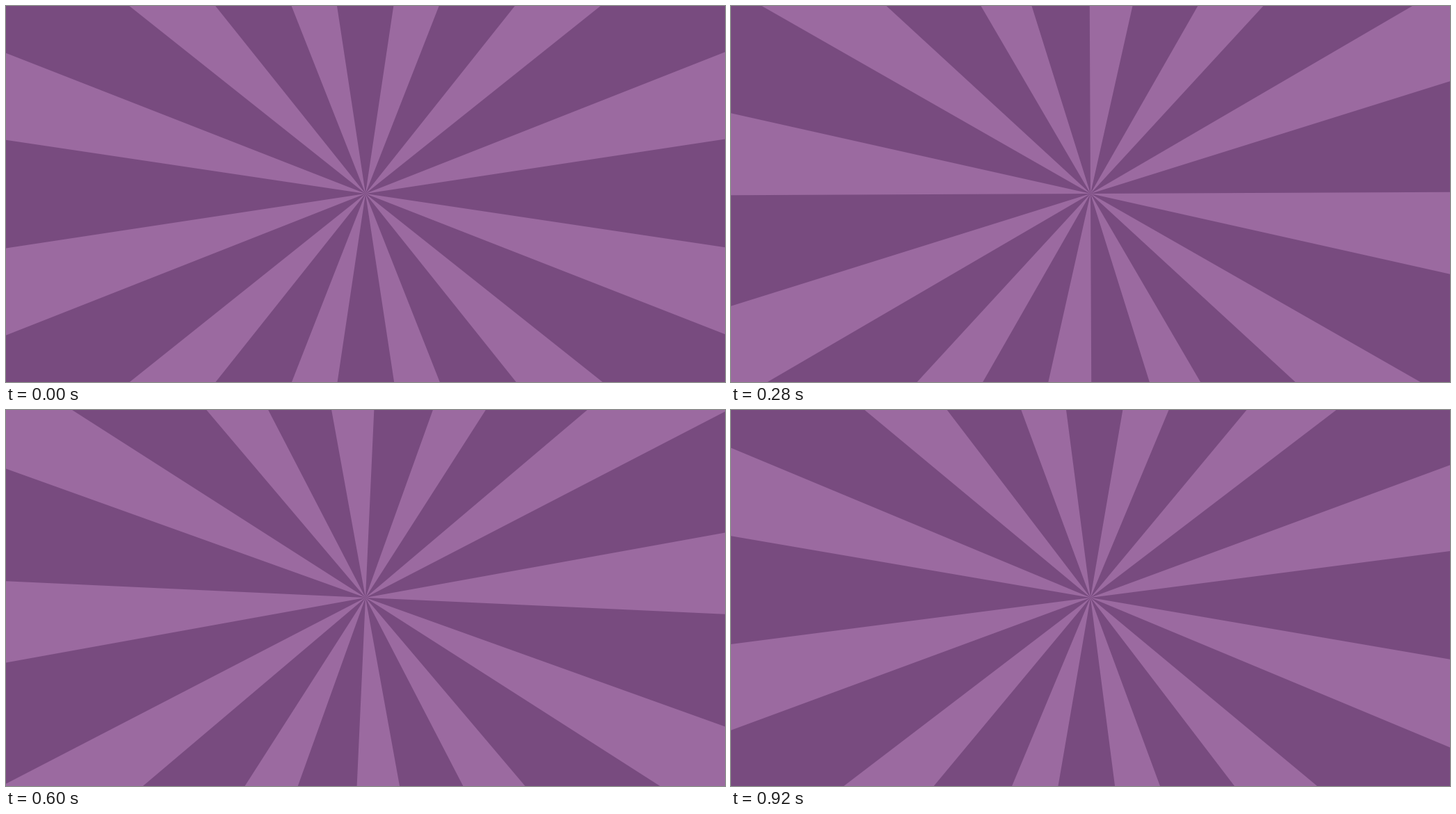
An HTML page with a canvas that plays this animation: 1034x541 px, repeating every 0.96 s.

```html
<!DOCTYPE html>
<html lang="en">
<head>
<meta charset="utf-8">
<title>Sunburst</title>
<style>
  html, body { margin: 0; width: 100%; height: 100%; overflow: hidden; background: #784b7f; }
  canvas { display: block; }
</style>
</head>
<body>
<canvas id="stage" width="1034" height="541"></canvas>
<script>
const ctx = document.getElementById('stage').getContext('2d');
const W = 1034, H = 541;
const CX = 517, CY = 270, RADIUS = 800;
const DARK = '#784b7f', LIGHT = '#9b6aa0';
const RAYS = 12, SPACING = 360 / RAYS, RAY_WIDTH = 12.88, START = 14.93;
const LOOP = 960, STEP = 40;

function rim(deg) {
  const a = deg * Math.PI / 180;
  ctx.lineTo(CX + RADIUS * Math.cos(a), CY + RADIUS * Math.sin(a));
}

function draw(ms) {
  // The burst turns counterclockwise by one ray spacing per loop.
  const step = Math.floor((ms % LOOP) / STEP);
  const turn = START - SPACING * step * STEP / LOOP;

  ctx.fillStyle = DARK;
  ctx.fillRect(0, 0, W, H);
  ctx.fillStyle = LIGHT;
  ctx.beginPath();
  for (let i = 0; i < RAYS; i++) {
    const mid = turn + i * SPACING;
    ctx.moveTo(CX, CY);
    rim(mid - RAY_WIDTH / 2);
    rim(mid + RAY_WIDTH / 2);
    ctx.closePath();
  }
  ctx.fill();
}

const start = performance.now();
function tick() {
  draw(performance.now() - start);
  requestAnimationFrame(tick);
}
tick();
</script>
</body>
</html>
```
